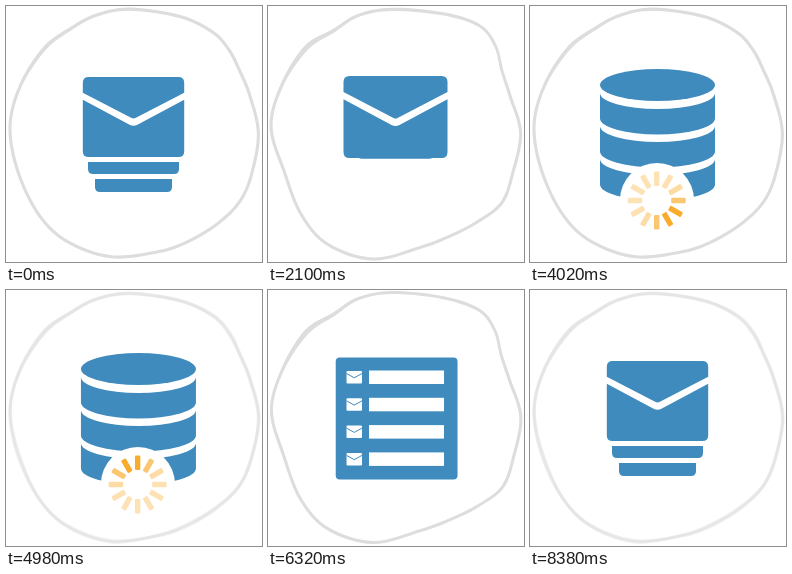
An HTML page for the animation above (8400 ms loop, 256x256 px).

```html
<!DOCTYPE html>
<html lang="en">
<head>
<meta charset="utf-8">
<title>Mail processing loop</title>
<style>
html, body { margin: 0; width: 100%; height: 100%; overflow: hidden; background: #fff; }
svg { display: block; width: 100vw; height: 100vh; }
</style>
</head>
<body>
<svg viewBox="0 0 256 256">
  <g id="rings" fill="#dddddd" fill-rule="evenodd"></g>
  <g id="list" fill="#3f8bbd"></g>
  <g id="stack" fill="#3f8bbd">
    <g id="trays"></g>
    <g id="mail">
      <path d="M-52-25V-35Q-52-41-46-41H46Q52-41 52-35V-25L2 1Q0 2-2 1Z"/>
      <path d="M-52-17.8L-4 8Q0 10-4 8L-4 8Q0 10 4 8L52-17.8V35Q52 41 46 41H-46Q-52 41-52 35Z"/>
    </g>
  </g>
  <g id="base" fill="#3f8bbd"></g>
</svg>
<script>
const LOOP = 8400, STEP = 200, NS = 'http://www.w3.org/2000/svg';
const $ = id => document.getElementById(id);

function add(parent, tag, attrs) {
  const el = document.createElementNS(NS, tag);
  for (const k in attrs) el.setAttribute(k, attrs[k]);
  return parent.appendChild(el);
}

const clamp = x => Math.max(0, Math.min(1, x));
const ramp = (t, from, length) => clamp((t - from) / length);
const smooth = p => p * p * (3 - 2 * p);
const easeIn = (t, from, length) => Math.max(0, (t - from) / length) ** 3;
const bell = (x, at, spread) => Math.exp(-(((x - at) / spread) ** 2));

// Hand-drawn outline: key points, pulled towards a circle by `round`
const outline = [
  [253, 127], [245, 168], [234, 197], [209, 216], [181, 230], [152, 241], [105, 253],
  [60, 239], [33, 209], [16, 165], [3.5, 121], [14, 80], [38, 42], [66, 24], [90, 9],
  [124, 3], [175, 8], [211, 20], [227, 40], [234, 66], [242, 90]
].map(([x, y]) => ({ angle: Math.atan2(y - 128, x - 128), radius: Math.hypot(x - 128, y - 128) }));

function closedCurve(pts) {
  const n = pts.length, at = i => pts[(i + n) % n];
  let d = 'M' + pts[0];
  for (let i = 0; i < n; i++) {
    const [a, b, c, e] = [at(i - 1), at(i), at(i + 1), at(i + 2)];
    const c1 = b.map((v, k) => v + (c[k] - a[k]) / 6);
    const c2 = c.map((v, k) => v - (e[k] - b[k]) / 6);
    d += `C${c1} ${c2} ${c}`;
  }
  return d + 'Z';
}

function ringPath(pose) {
  const round = pose < 2 ? 0.6 - 0.1 * pose : 0;
  const edge = side => closedCurve(outline.map(({ angle, radius }) => {
    const width = 3.1 + 2 * (1 - round) * bell(angle, -2.35, 0.22);
    const wobble = 0.5 * Math.sin(3 * angle + 2 * pose);
    const r = radius + (124 - radius) * round + wobble + side * width / 2;
    return [128 + r * Math.cos(angle), 128 + r * Math.sin(angle)];
  }));
  return edge(1) + edge(-1);
}

const rings = [0, 1, 2, 3].map(pose => add($('rings'), 'path', { d: ringPath(pose) }));

// Trays under the envelope, rounded at the bottom
const tray = (y, half, h) => add($('trays'), 'path', {
  d: `M${127.5 - half} ${y}h${2 * half}v${h - 5}q0 5-5 5h${10 - 2 * half}q-5 0-5-5Z`
});
const trays = [tray(156, 45.5, 12), tray(173, 38.5, 13)];

// List with four mail rows
const list = $('list');
add(list, 'rect', { x: 66.7, y: 67.5, width: 121.8, height: 122, rx: 4 });
for (let i = 0; i < 4; i++) {
  const y = 80.5 + i * 27.3;
  add(list, 'rect', { x: 100, y, width: 75, height: 13.5, fill: '#fff' });
  add(list, 'rect', { x: 77.5, y: y + 0.5, width: 15.5, height: 12.5, rx: 1, fill: '#fff' });
  add(list, 'path', {
    d: `M77.5 ${y + 3}L85.2 ${y + 7.3}L93 ${y + 3}`,
    fill: 'none', stroke: '#3f8bbd', 'stroke-width': 1
  });
}

// Database cylinder and spinner
const base = $('base');
add(base, 'ellipse', { cx: 127.5, cy: 79, rx: 57.5, ry: 16 });
for (let i = 0; i < 3; i++) {
  const top = 87 + 33 * i;
  add(base, 'path', {
    d: `M70 ${top}A57.5 16 0 0 0 185 ${top}v25.5A57.5 16 0 0 1 70 ${top + 25.5}Z`
  });
}
add(base, 'circle', { cx: 127, cy: 194, r: 37, fill: '#fff' });
const spokes = Array.from({ length: 12 }, (_, i) => add(base, 'rect', {
  x: 124, y: 165.5, width: 5.4, height: 14.5, rx: 1.2, fill: '#f9a61f',
  transform: `rotate(${i * 30} 126.7 194.5)`
}));

function place(el, dx, alpha) {
  el.setAttribute('transform', `translate(${dx} 0)`);
  el.setAttribute('opacity', alpha);
  el.setAttribute('display', alpha > 0 && dx < 260 ? 'inline' : 'none');
}

// The outline changes pose every STEP, with a short half-and-half blend
function drawRings(t) {
  const pose = time => Math.floor((time % LOOP) / STEP) % 4;
  const now = pose(t), next = pose(t + 20);
  rings.forEach((r, i) => r.setAttribute('opacity', ((i === now) + (i === next)) / 2));
}

function drawStack(t) {
  const returning = t >= 6200;
  const fold = returning ? 0 : smooth(ramp(t, 1200, 800));
  const grow = returning ? 0 : smooth(ramp(t, 2100, 500));
  const dx = returning ? 0 : 130.7 * easeIn(t, 2300, 580);
  const scale = 0.975 + 0.025 * fold + 0.62 * grow;
  $('mail').setAttribute('transform', `translate(127.5 ${111 + 4.5 * grow}) scale(${scale})`);
  trays.forEach((el, i) => el.setAttribute('transform', `translate(0 ${-16.6 * (i + 1) * fold})`));
  place($('stack'), dx, returning ? ramp(t, 6900, 220) : 1);
}

function drawBase(t) {
  place(base, 180 * easeIn(t, 4800, 600), ramp(t, 2890, 190));
  const head = 5 + Math.floor((t - 3940) / 140);
  spokes.forEach((s, i) => {
    const behind = ((head - i + 6) % 12 + 12) % 12 - 6;
    s.setAttribute('opacity', 0.33 + 0.67 * bell(behind, 0.5, 1.7));
  });
}

function draw(t) {
  drawRings(t);
  drawStack(t);
  drawBase(t);
  place(list, 190 * easeIn(t, 6200, 690), ramp(t, 5380, 220));
}

const start = performance.now();
function tick() {
  draw((performance.now() - start) % LOOP);
  requestAnimationFrame(tick);
}
draw(0);
requestAnimationFrame(tick);
</script>
</body>
</html>
```
